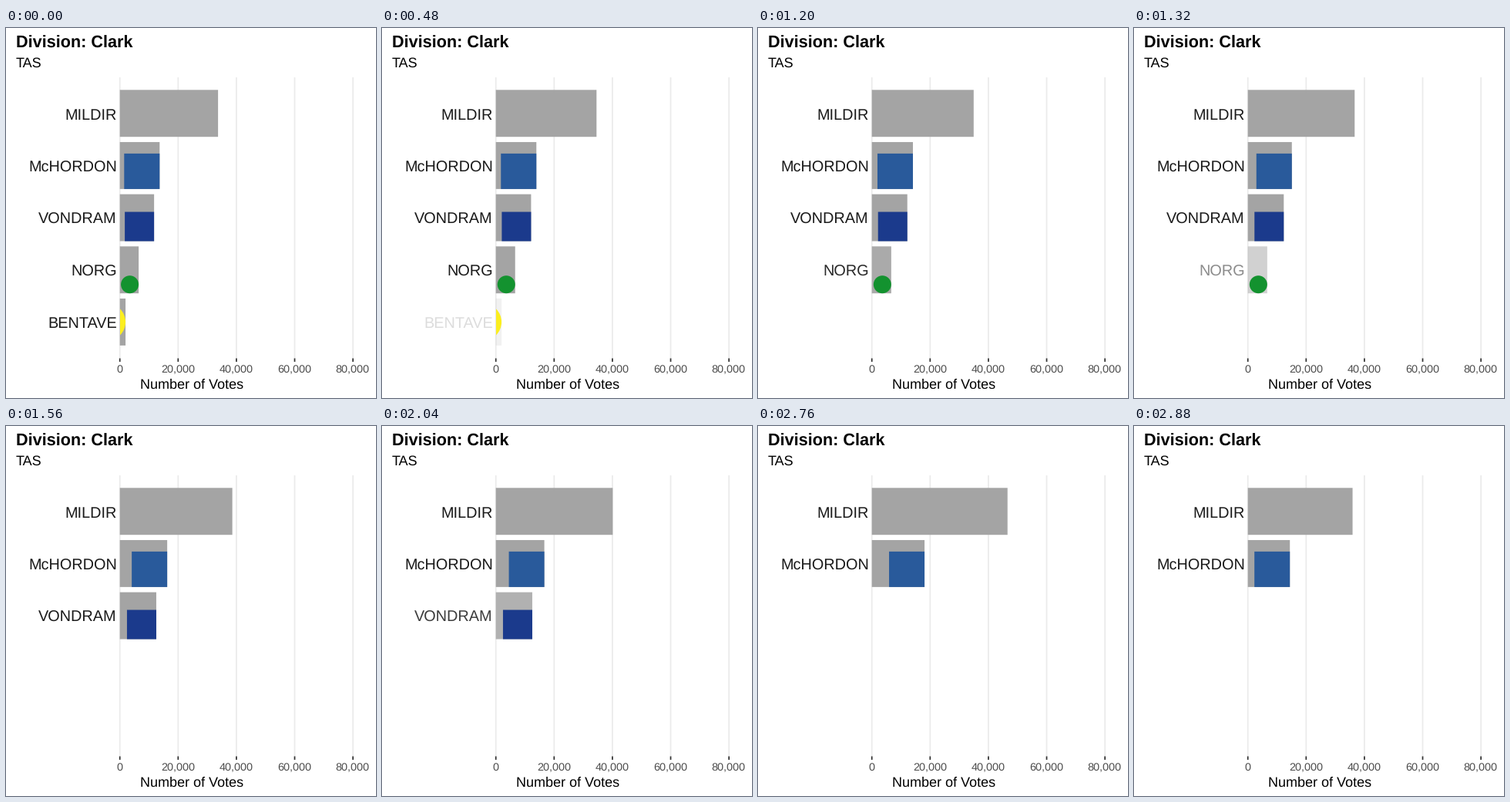
A matplotlib script that plays this animation: 480x480 px, repeating every 3000 ms.

```python
import matplotlib.pyplot as plt
from matplotlib.animation import FuncAnimation
from matplotlib.patches import Circle, Rectangle

SIZE, DPI = 480, 72
FRAMES, INTERVAL = 25, 120
ZERO, PX_PER_VOTE = 147.7, 302.4 / 80000
TOP, PITCH, BAR = 80.3, 67.67, 60.9

# First and last frame of each move between rounds; the final one wraps round.
MOVES = [(0, 6), (9, 13), (16, 19), (22, 25)]

# Name, votes in each round, badge kind, badge size, badge colour
CANDIDATES = [
    ("MILDIR", [33700, 34700, 38600, 48800], None, 0, None),
    ("McHORDON", [13650, 13950, 16250, 18850], "square", 46, "#295a9b"),
    ("VONDRAM", [11750, 12150, 12500], "square", 38, "#1b3a8c"),
    ("NORG", [6450, 6650], "circle", 23, "#13922f"),
    ("BENTAVE", [1950], "circle", 48, "#fbee1f"),
]

plt.rcParams.update({"font.family": "Liberation Sans", "text.hinting": "none",
                     "text.hinting_factor": 8})

fig = plt.figure(figsize=(SIZE / DPI, SIZE / DPI), dpi=DPI, facecolor="white")
ax = fig.add_axes([0, 0, 1, 1])
ax.set(xlim=(0, SIZE), ylim=(SIZE, 0))
ax.axis("off")


def to_x(votes):
    return ZERO + votes * PX_PER_VOTE


def label(x, y, text, size, ha="left", **style):
    return ax.text(x, y, text, fontsize=size, ha=ha, va="baseline", **style)


def rule(x, top, bottom, color):
    ax.plot([x, x], [top, bottom], color=color, lw=1.75, zorder=0,
            snap=False, solid_capstyle="butt")


def ease(t):
    return 4 * t ** 3 if t < 0.5 else 1 - 4 * (1 - t) ** 3


def draw_chart():
    label(13, 26, "Division: Clark", 21.6, weight="bold")
    label(13, 51, "TAS", 18)
    label(241.5, 468, "Number of Votes", 18, ha="center")
    for votes in range(0, 80001, 20000):
        x = to_x(votes)
        rule(x, 64, 428.5, "#ebebeb")
        rule(x, 428.5, 433, "#333333")
        label(x - 0.3, 447, f"{votes:,}", 14.4, ha="center", color="#4d4d4d")


class Row:
    def __init__(self, index, name, votes, kind, size, color):
        self.votes, self.size, self.kind = votes, size, kind
        top = TOP + PITCH * index
        self.bar = ax.add_patch(Rectangle((ZERO, top), 1, BAR, fc="#a4a4a4",
                                          lw=0, snap=False, zorder=2))
        self.text = label(144, top + 38.5, name, 19.92, ha="right",
                          color="#1a1a1a")
        self.badge = None
        if kind == "square":
            self.badge = Rectangle((0, top + BAR - size), size, size)
        elif kind == "circle":
            center = top + (BAR / 2 if size > 40 else BAR - size / 2)
            self.badge = Circle((0, center), size / 2)
        if self.badge:
            self.badge.set(fc=color, lw=0, snap=False, zorder=3)
            ax.add_patch(self.badge)
            self.badge.set_clip_path(plot_area)

    def show(self, stage, progress):
        visible = stage < len(self.votes)
        for part in (self.bar, self.text, self.badge):
            if part:
                part.set_visible(visible)
        if not visible:
            return
        start, alpha = self.votes[stage], 1
        if stage + 1 < len(self.votes):
            end = self.votes[stage + 1]
        elif stage + 1 == len(MOVES):
            end = self.votes[0]
        else:
            end, alpha = start, 1 - progress
        right = to_x(start + (end - start) * progress)
        self.bar.set_width(right - ZERO)
        self.bar.set_alpha(alpha)
        self.text.set_alpha(alpha)
        if self.kind == "square":
            self.badge.set_x(right - self.size)
        elif self.kind == "circle":
            self.badge.center = right - self.size / 2, self.badge.center[1]


def update(frame):
    stage = next(k for k, (_, last) in enumerate(MOVES) if frame < last)
    first, last = MOVES[stage]
    progress = ease(max(0, (frame - first) / (last - first)))
    for row in rows:
        row.show(stage, progress)
    return []


plot_area = Rectangle((ZERO, 64), 320, 366, transform=ax.transData)
draw_chart()
rows = [Row(i, *candidate) for i, candidate in enumerate(CANDIDATES)]
animation = FuncAnimation(fig, update, frames=FRAMES, interval=INTERVAL,
                          init_func=lambda: update(0), repeat=True,
                          repeat_delay=0, blit=False)
plt.show()
```
